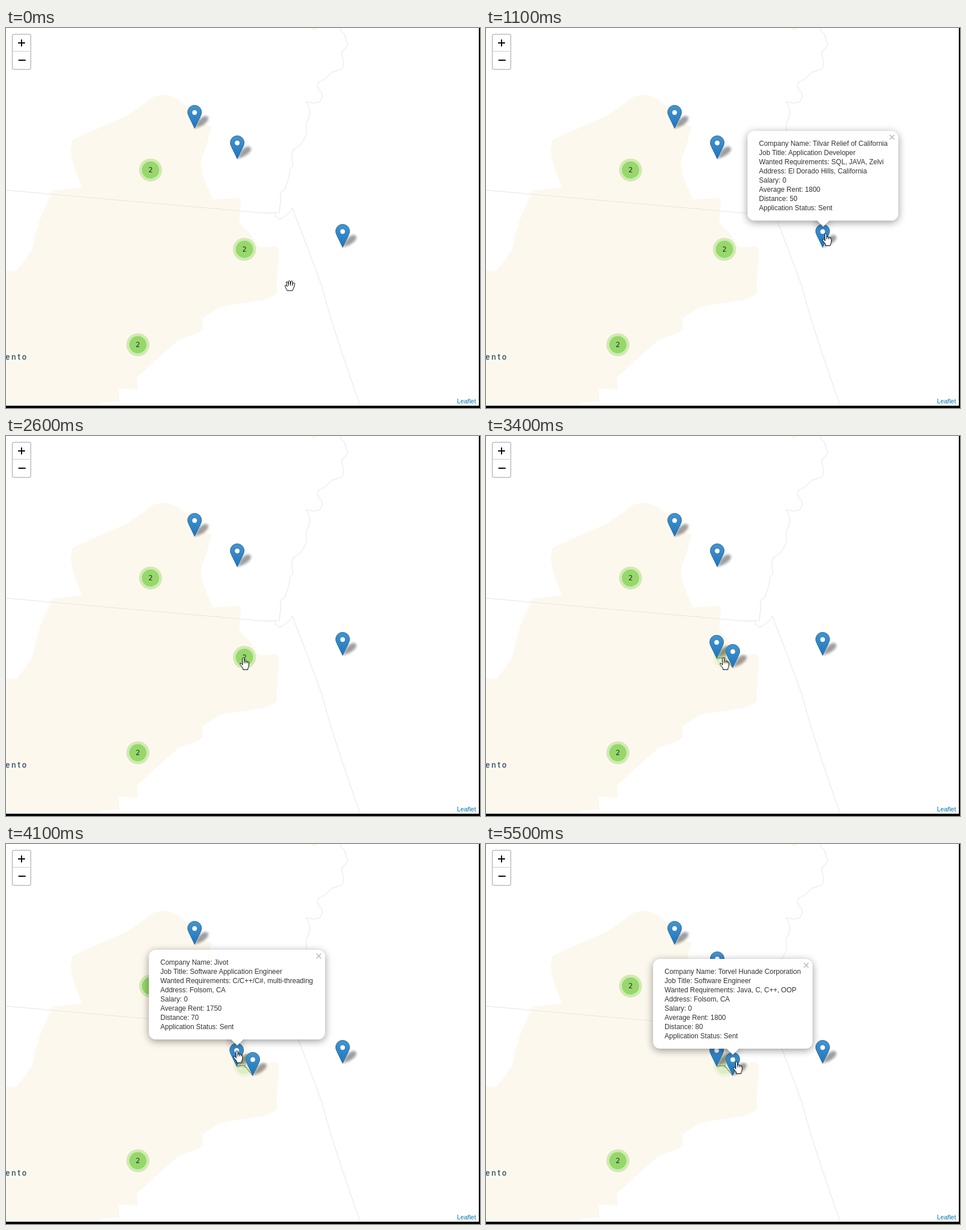
An HTML page for the animation above (6500 ms loop, 823 px wide and 661 px high).

```html
<!DOCTYPE html>
<html lang="en">
<head>
<meta charset="utf-8">
<title>Job map</title>
<style>
  html, body { margin: 0; width: 100%; height: 100%; overflow: hidden; background: #fff; }
  body { position: relative; font: 12px/16px "Liberation Sans", Arial, sans-serif; color: #333; }
  svg { position: absolute; left: 0; top: 0; }
  .line { fill: none; stroke: #e4e4e4; stroke-linejoin: round; }
  .count { font: 12px "DejaVu Sans", sans-serif; fill: #222b3a; text-anchor: middle; }
  .place { font: 500 14px Roboto, sans-serif; letter-spacing: 3px; fill: #3c586b; }
  .credit { font-size: 11px; fill: #0078a8; }
  .popup { position: absolute; height: 156px; opacity: 0; }
  .box { position: absolute; inset: 0; padding: 14px 20px; box-sizing: border-box; white-space: pre;
    background: #fff; border-radius: 12px; box-shadow: 0 3px 14px rgba(0, 0, 0, .4); }
  .tip { position: absolute; left: 50%; top: 100%; width: 40px; height: 20px; margin-left: -20px; overflow: hidden; }
  .tip::before { content: ""; display: block; width: 17px; height: 17px; margin: -10px auto 0;
    background: #fff; transform: rotate(45deg); box-shadow: 0 3px 14px rgba(0, 0, 0, .4); }
  .close { position: absolute; right: 2px; top: 4px; width: 18px; text-align: center;
    font: bold 16px/14px "DejaVu Sans", sans-serif; color: #c3c3c3; }
  .zoom { position: absolute; left: 10px; top: 10px; width: 30px; height: 59px; border: 2px solid #ccc; border-radius: 4px; background: #fff; }
</style>
</head>
<body>
<svg width="823" height="661">
  <defs>
    <linearGradient id="blue" x1="0" y1="0" x2="0" y2="1">
      <stop offset="0" stop-color="#4495cf"/><stop offset="1" stop-color="#1d74c1"/>
    </linearGradient>
    <filter id="soft" x="-50%" y="-50%" width="200%" height="200%"><feGaussianBlur stdDeviation="2.2"/></filter>
    <g id="shadow">
      <path d="M0 0C3-8 8-20 18-22C28-22 25-11 10-4Z" fill="#000" opacity=".38" filter="url(#soft)"/>
    </g>
    <g id="pin" transform="translate(-12.5 -41)">
      <path d="M12.5.5C5.9.5.5 5.9.5 12.5c0 2.4.8 4.8 1.8 6.8L12.5 40.5 22.7 19.3c1-2 1.8-4.4 1.8-6.8C24.5 5.9 19.1.5 12.5.5z"
        fill="url(#blue)" stroke="#2e6c97"/>
      <circle cx="12.5" cy="13" r="4.6" fill="#fff" stroke="#2e7ab5" stroke-width=".8"/>
    </g>
    <g id="cluster">
      <circle r="20" fill="#b5e28c" fill-opacity=".6"/>
      <circle r="15" fill="#6ecc39" fill-opacity=".6"/>
      <text class="count" y="4">2</text>
    </g>
  </defs>

  <path fill="#fdf8ee" d="M0 422H18L28 410 46 385 51 358 60 330 72 302 81 283 132 277 119 245 112 213 116 194 213 151
    255 120 Q266 116 279 116 L298 124 318 138 340 164 357 172 350 197 338 234 344 262 359 298 380 297 400 295 Q406 295 408 301
    L405 338 423 357 440 381 455 381 468 379 Q474 381 474 390 L470 440 470 463 447 473 372 485 341 505 342 524 336 529
    300 542 228 607 229 629 196 627 197 650 166 651 161 658H0ZM530 0H541L535 7Z"/>
  <path class="line" d="M0 282L450 322 475 321M466 321L469 328 475 333 481 330 487 324 492 322 497 313 519 370 547 445 564 505 580 555 615 658"/>
  <path class="line" d="M580 0L582 7 588 11 590 20 593 28 591 34 584 40 583 46 586 55 586 68 580 73 565 77 559 84 550 91 543 94 540 99
    543 109 549 114 549 121 545 128 534 131 521 128 526 137 528 148 525 158 521 165 522 184 516 196 510 204 499 212 496 220
    498 239 493 247 491 261 486 276 483 282 476 287 477 300 474 321"/>
  <text class="place" x="-1" y="577">ento</text>

  <g id="legs" fill="none" stroke="#222" stroke-width="1.5" opacity=".5"><path/></g>
  <g id="pins"></g>
  <use href="#cluster" x="251" y="247"/>
  <use href="#cluster" x="229" y="551"/>
  <text class="credit" x="783" y="653">Leaflet</text>
</svg>

<div class="zoom"></div>
<svg width="60" height="80">
  <path d="M12 40.5H42" stroke="#ccc"/>
  <path d="M21 26H33M27 20V32M21.500 56H34" stroke="#000" stroke-width="2"/>
</svg>

<div id="popups"></div>

<svg width="823" height="661">
  <path d="M821 0H823V661H0V657H821Z"/>
  <g id="cursor" fill="#fff" stroke="#000" stroke-linejoin="round" stroke-linecap="round">
    <g id="pointer">
      <path d="M-3.500-9.500Q-2-11.500-.5-9.500V-4.500Q1.200-5.700 2.500-4Q4.200-5 5.300-3.200Q7.500-3.800 7.700-1.500V3Q7.700 6 6 8V10.500H-2.500V8L-7.500 1.500Q-8.500-.8-6-.7L-3.500 2Z"/>
      <path d="M-.5-4.500V-1M2.500-4V-1M5.300-3.200V-1" fill="none"/>
    </g>
    <g id="grab">
      <path d="M-5 8.500L-8.500 1.500Q-9-.8-7-.5L-4.700 1.500-6.500-5Q-6.300-7.500-4.300-6.500L-2.500-2.500V-7.500Q-1.200-9.800.3-7.500L.8-2.500 2-7.500Q3.600-9.200 4.700-7L4.200-2 6-4.500Q8-5.500 8.500-3.500L7 3 4.500 8.500Z"/>
      <path d="M-2.500-2.500V0M.8-2.500V0M4.200-2V0" fill="none"/>
    </g>
  </g>
</svg>

<script>
const LOOP = 6500, STEP = 100;
const $ = id => document.getElementById(id);
const SVG_NS = "http://www.w3.org/2000/svg";

// Linear interpolation through keys of the form [time, value, ...].
function track(keys, t) {
  const next = keys.findIndex(key => key[0] > t);
  if (next === 0) return keys[0].slice(1);
  if (next < 0) return keys[keys.length - 1].slice(1);
  const a = keys[next - 1], b = keys[next], p = (t - a[0]) / (b[0] - a[0]);
  return a.slice(1).map((v, i) => v + (b[i + 1] - v) * p);
}

function addUse(name) {
  const use = document.createElementNS(SVG_NS, "use");
  use.setAttribute("href", "#" + name);
  $("pins").append(use);
  return use;
}

function place(node, x, y) {
  node.setAttribute("x", x);
  node.setAttribute("y", y);
}

const HUB = [414, 385];
const hub = addUse("cluster");
place(hub, ...HUB);
const pins = [
  { tip: [327.5, 175] }, { tip: [401.5, 228] }, { tip: [584.5, 382] },
  { tip: [400.5, 387], spread: true }, { tip: [428.5, 403], spread: true }
];
for (const part of ["shadow", "pin"])
  for (const pin of pins) {
    pin[part] = addUse(part);
    place(pin[part], ...pin.tip);
  }

const LABELS = ["Company Name", "Job Title", "Wanted Requirements", "Address",
  "Salary", "Average Rent", "Distance", "Application Status"];
const popups = [
  { left: 454, top: 179, width: 262,
    values: ["Tilvar Relief of California", "Application Developer", "SQL, JAVA, Zelvi", "El Dorado Hills, California", 0, 1800, 50, "Sent"],
    fade: [[800, 0], [900, .25], [1000, .8], [1100, 1], [1600, 1], [1700, .97], [1800, .88], [1900, .7], [2000, .25], [2100, 0]] },
  { left: 248, top: 184, width: 306,
    values: ["Jivot", "Software Application Engineer", "C/C++/C#, multi-threading", "Folsom, CA", 0, 1750, 70, "Sent"],
    fade: [[3800, 0], [3900, .25], [4000, .8], [4100, 1], [5100, 1], [5200, .75], [5300, .25], [5400, 0]] },
  { left: 290, top: 200, width: 277,
    values: ["Torvel Hunade Corporation", "Software Engineer", "Java, C, C++, OOP", "Folsom, CA", 0, 1800, 80, "Sent"],
    fade: [[5100, 0], [5200, .25], [5300, .75], [5400, .96], [5500, 1]] }
];
for (const popup of popups) {
  const node = popup.node = document.createElement("div");
  node.className = "popup";
  for (const side of ["left", "top", "width"]) node.style[side] = popup[side] + "px";
  const text = LABELS.map((label, i) => `${label}: ${popup.values[i]}`).join("\n");
  node.innerHTML = `<div class="box">${text}</div><div class="tip"></div><div class="close">×</div>`;
  $("popups").append(node);
}

const CURSOR = [[200, 493, 448], [800, 592, 368], [2000, 592, 368], [2300, 450, 373], [2600, 414, 396],
  [3400, 414, 396], [3800, 403, 370], [4500, 403, 370], [4900, 437, 389]];
const SPREAD = [[2700, 0], [2800, .3], [2900, .72], [3000, .94], [3100, 1]];

function draw(now) {
  const t = Math.floor(now % LOOP / STEP) * STEP;

  const [spread] = track(SPREAD, t);
  hub.setAttribute("opacity", 1 - .7 * spread);
  const ends = pins.filter(pin => pin.spread).map(pin => {
    const at = HUB.map((v, i) => v + (pin.tip[i] - v) * spread);
    for (const part of ["shadow", "pin"]) {
      place(pin[part], ...at);
      pin[part].setAttribute("opacity", spread);
    }
    return at;
  });
  $("legs").firstChild.setAttribute("d", spread ? `M${ends[0]}L${HUB}L${ends[1]}` : "");

  for (const popup of popups) popup.node.style.opacity = track(popup.fade, t)[0];

  const overMap = t < 800 || (t > 2000 && t < 2500);
  $("cursor").setAttribute("transform", `translate(${track(CURSOR, t)})`);
  $("grab").style.display = overMap ? "" : "none";
  $("pointer").style.display = overMap ? "none" : "";
}

const start = performance.now();
(function frame() {
  draw(performance.now() - start);
  requestAnimationFrame(frame);
})();
</script>
</body>
</html>
```
